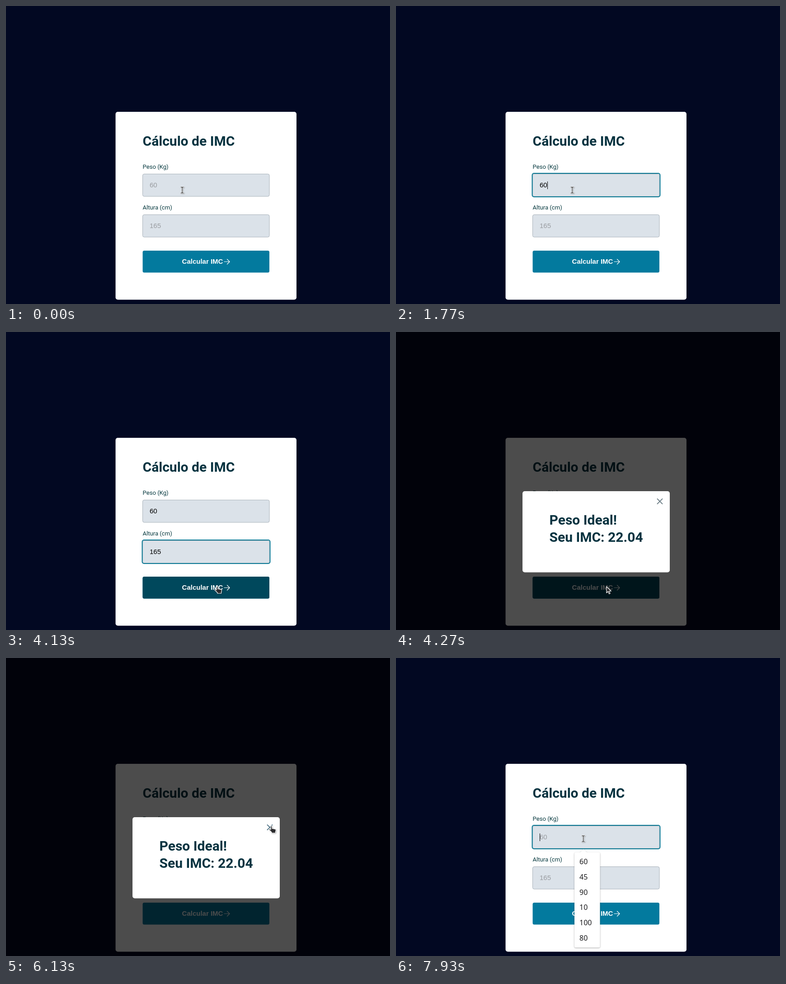
An HTML page that plays this animation: 850 px wide and 659 px high, repeating every 8 s.

```html
<!DOCTYPE html>
<html lang="pt">
<head>
<meta charset="utf-8">
<title>Cálculo de IMC</title>
<style>
  html, body { margin: 0; width: 100%; height: 100%; overflow: hidden; background: #020822; }
  svg { display: block; }
  text { font-family: Roboto, sans-serif; white-space: pre; }
  .title { font-size: 30px; font-weight: 700; fill: #083340; }
  .label { font-size: 13.125px; fill: #06393f; }
  .value { font: 15px "Liberation Sans", sans-serif; }
  .button { font: 700 15px "Liberation Sans", sans-serif; fill: #fff; }
  .item { font: 16px "Noto Sans", sans-serif; fill: #1c1c1e; }
  .line { fill: none; stroke-linecap: round; stroke-linejoin: round; }
  #popup { filter: drop-shadow(0 1px 1.5px rgba(0, 0, 0, .35)); }
  #cursor { filter: drop-shadow(1px 1px 1px rgba(0, 0, 0, .3)); }
</style>
</head>
<body>
<svg id="stage" width="850" height="659" viewBox="0 0 850 659">
  <rect width="850" height="659" fill="#020822"/>
  <rect x="242.5" y="234" width="400.5" height="415.5" rx="5" fill="#fff"/>
  <text class="title" x="302.5" y="308.5">Cálculo de IMC</text>
  <text class="label" x="302.5" y="359.5">Peso (Kg)</text>
  <text class="label" x="302.5" y="449.5">Altura (cm)</text>
  <g id="fields"></g>
  <rect x="302.5" y="541" width="280.5" height="48.5" rx="3.5" fill="#037a9e"/>
  <rect id="hover" x="302.5" y="541" width="280.5" height="48.5" rx="3.5" fill="#00485c"/>
  <text class="button" x="389.6" y="570">Calcular IMC</text>
  <path class="line" d="M483 565.5h11.5M489.5 560l5.5 5.5-5.5 5.5" stroke="#fff" stroke-width="1.2"/>
  <g id="popup"></g>
  <g id="modal">
    <rect width="850" height="659" fill="#000" opacity=".7"/>
    <rect x="280" y="352" width="326" height="179.5" rx="5" fill="#fff"/>
    <path id="close" class="line" d="M578.5 369l11 11m0-11l-11 11" stroke-width="1.8"/>
    <text class="title" x="339.5" y="426">Peso Ideal!</text>
    <text class="title" x="339.5" y="463.5">Seu IMC: 22.04</text>
  </g>
  <g id="cursor"></g>
</svg>
<script>
const LOOP = 8000, OPEN = 4270, CLOSE = 6270;
const DIGIT = 8.34, TEXT_X = 318;
const $ = id => document.getElementById(id);

// Each list holds [time, ...values]; a value lasts until the next entry.
const weights = [[0, ""], [1170, "6"], [1640, "60"], [CLOSE, ""]];
const heights = [[0, ""], [2430, "1"], [2830, "16"], [3230, "165"], [CLOSE, ""]];
const focuses = [[0, -1], [570, 0], [2100, 1], [OPEN, -1], [7930, 0]];
const hovers = [[0, 0], [3990, .5], [4130, 1], [4430, .5], [4600, 0]];
const all = ["60", "45", "90", "10", "100", "80"];
const popups = [
  [0, [], 0, 0],
  [570, all, 430, 56.5],
  [1300, ["60"], 430, 56.5],
  [1770, [], 0, 0],
  [2430, ["165", "170", "180", "160"], 520, 68],
  [2970, ["165", "160"], 520, 56.5],
  [3230, [], 0, 0],
  [7930, all, 430, 56.5]
];
const mouse = [
  [0, 390, 407],
  [3570, 396, 420], [3710, 412, 455], [3840, 436, 500], [3990, 457, 545], [4130, 466, 563],
  [4730, 462, 555], [4860, 450, 525], [5000, 441, 490], [5130, 442, 458],
  [5270, 460, 430], [5400, 495, 408], [5530, 537, 394], [5670, 572, 386],
  [5800, 580, 378], [5930, 585, 373], [6130, 586, 372],
  [6530, 570, 376], [6650, 546, 382], [6770, 521, 389],
  [6900, 500, 420], [7050, 470, 460], [7200, 445, 483], [7340, 428, 462],
  [7480, 419, 425], [7630, 418, 400], [7930, 414.5, 399.5]
];

const shapes = {
  arrow: "M0 0v14l3.4-3.2 2.3 5.4 2.3-1-2.3-5.2h4.6z",
  hand: "M0 0q1.5-1.5 3 0v5l7 1.5q1.5.5 1.5 2l-1 4.5v2h-8.5v-1.5l-6-6q0-2 2-1.5l2 1.5z",
  beam: "M-3-6.5h2l1 1 1-1h2M0-5.5v11M-3 6.5h2l1-1 1 1h2"
};

const at = (list, t) => list.findLast(entry => entry[0] <= t);
const inside = (x, y, left, top, right, bottom) => x >= left && x <= right && y >= top && y <= bottom;

function field(y, value, hint, focused, caret) {
  const ring = focused
    ? `<rect x="301.5" y="${y - 1}" width="283" height="52" rx="4" fill="none" stroke="#0a7a96" stroke-width="2"/>` : "";
  const bar = focused && caret
    ? `<rect x="${Math.round(TEXT_X + DIGIT * value.length)}" y="${y + 17}" width="1" height="17"/>` : "";
  return `<rect x="302.5" y="${y + .5}" width="280.5" height="49.5" rx="3.5" fill="#dbe2e9" stroke="#a9b2ba"/>
    ${ring}<text class="value" x="${TEXT_X}" y="${y + 30}" fill="${value ? "#000" : "#999ca0"}">${value || hint}</text>${bar}`;
}

function popup([, items, top, width]) {
  if (!items.length) return "";
  const height = items.length * 33.7 + 8;
  const rows = items.map((s, i) => `<text class="item" x="406" y="${top + 26.3 + i * 33.7}">${s}</text>`);
  return `<path d="M407 ${top + .5}l8-8 8 8z" fill="#fff"/>
    <rect x="395" y="${top}" width="${width}" height="${height}" rx="3" fill="#fff"/>${rows.join("")}`;
}

function cursorKind(x, y, open) {
  if (open) {
    if (inside(x, y, 576, 366, 592, 383)) return "hand";
    return inside(x, y, 340, 397, 546, 472) ? "beam" : "arrow";
  }
  if (inside(x, y, 303, 541, 583, 589)) return "hand";
  return inside(x, y, 303, 371, 583, 421) || inside(x, y, 303, 461, 583, 511) ? "beam" : "arrow";
}

function cursor(x, y, kind) {
  const d = shapes[kind];
  const body = kind === "beam"
    ? `<path class="line" d="${d}" stroke="#fff" stroke-width="2.6"/><path class="line" d="${d}" stroke="#222" stroke-width="1.1"/>`
    : `<path d="${d}" fill="#2c2c2e" stroke="#fff" stroke-width="1.2" stroke-linejoin="round"/>`;
  return `<g transform="translate(${x} ${y})">${body}</g>`;
}

function render(t) {
  const open = t >= OPEN && t < CLOSE;
  const weight = at(weights, t), height = at(heights, t), focus = at(focuses, t);
  const lastKey = Math.max(weight[0], height[0], focus[0]);
  const caret = (t - lastKey) % 1000 < 600 && !(t >= 3710 && t < OPEN);
  const [, x, y] = at(mouse, t);
  const kind = cursorKind(x, y, open);

  $("fields").innerHTML = field(371, weight[1], "60", focus[1] === 0, caret)
    + field(461, height[1], "165", focus[1] === 1, caret);
  $("hover").setAttribute("opacity", at(hovers, t)[1]);
  $("popup").innerHTML = popup(at(popups, t));
  $("modal").setAttribute("visibility", open ? "visible" : "hidden");
  $("close").setAttribute("stroke", kind === "hand" ? "#56788a" : "#6f8088");
  $("cursor").innerHTML = cursor(x, y, kind);
}

let start;
function tick(now) {
  start ??= now;
  render((now - start) % LOOP);
  requestAnimationFrame(tick);
}
render(0);
requestAnimationFrame(tick);
</script>
</body>
</html>
```
